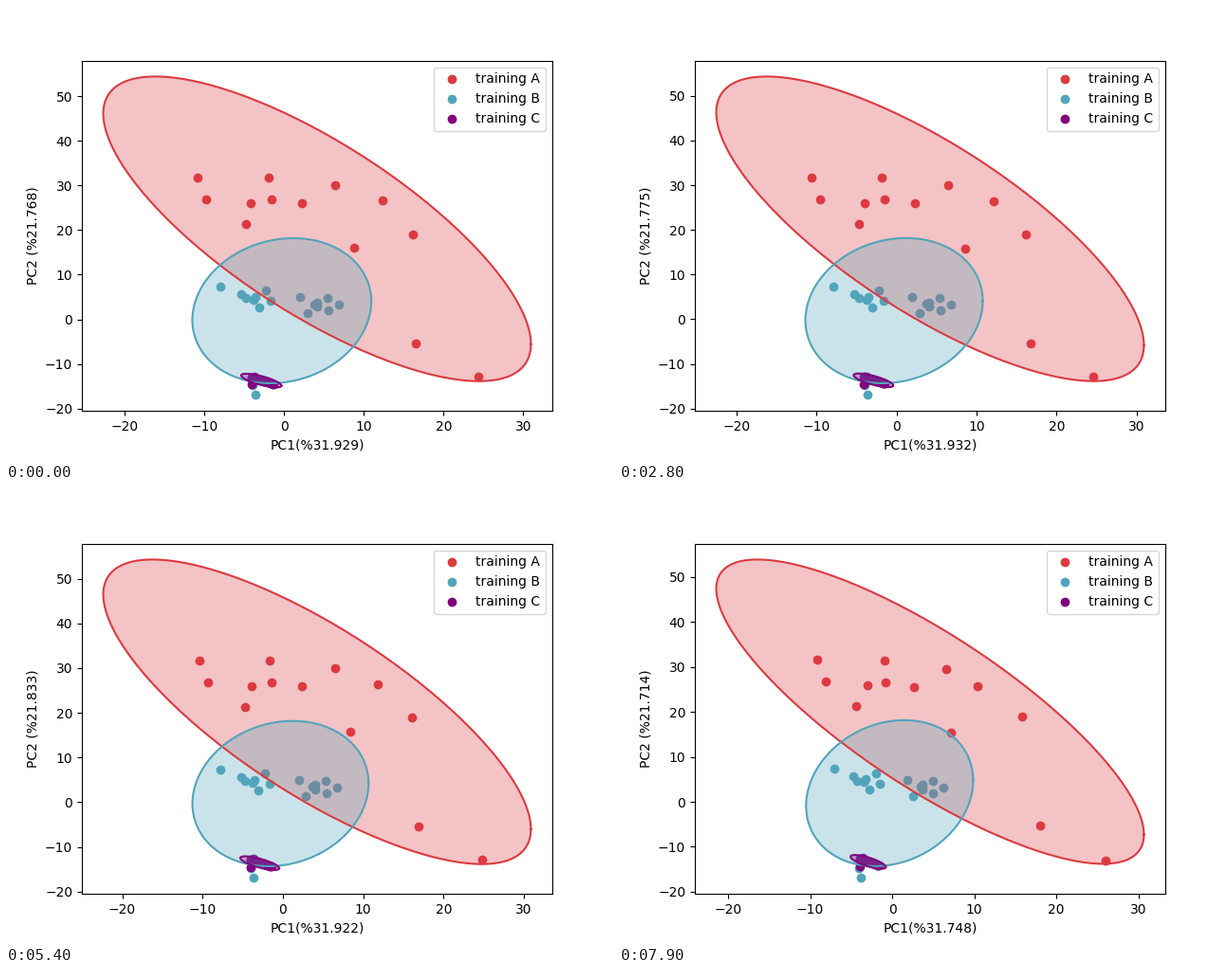
Animation of 640 by 480 pixels, one loop 8 s. Source, as a matplotlib script:

```python
import numpy as np
import matplotlib.pyplot as plt
from matplotlib.animation import FuncAnimation

FRAMES, STEP = 80, 100
COLORS = "#dc3a40", "#52a4bb", "purple"
CHI = np.sqrt(5.991)  # 95 % confidence in two dimensions
MARGIN = 0.05

# Samples drift from an early to a late projection.
KEYS = [0, 18, 28, 41, 54, 70, 79]
PROGRESS = [0, 0.1, 0.14, 0.33, 0.25, 0.95, 1]
PC1 = [31.929, 31.941, 31.932, 31.914, 31.922, 31.732, 31.748]
PC2 = [21.768, 21.770, 21.775, 21.790, 21.833, 21.731, 21.714]

A_EARLY = np.array([
    (-10.86, 31.7), (-9.79, 26.8), (-4.79, 21.3), (-4.19, 26.0),
    (-1.93, 31.7), (-1.57, 26.8), (2.24, 26.0), (6.40, 30.0),
    (8.79, 16.0), (12.36, 26.6), (16.17, 19.0), (16.52, -5.5),
    (24.38, -12.9)])
A_LATE = np.array([
    (-9.16, 31.6), (-8.12, 26.8), (-4.43, 21.3), (-3.04, 26.0),
    (-0.96, 31.4), (-0.84, 26.6), (2.62, 25.6), (6.55, 29.6),
    (7.13, 15.3), (10.36, 25.8), (15.79, 19.0), (17.99, -5.2),
    (25.96, -13.0)])

B_EARLY = np.array([
    (-8.0, 7.3), (-5.38, 5.6), (-4.79, 4.7), (-3.83, 4.4), (-3.6, 5.0),
    (-3.12, 2.7), (-2.29, 6.4), (-1.69, 4.1), (2.0, 4.9), (2.95, 1.3),
    (3.79, 3.4), (4.14, 2.8), (4.14, 3.8), (5.45, 4.7), (5.57, 2.0),
    (6.88, 3.2), (-3.6, -16.96), (-3.95, -14.7)])
bx, by = B_EARLY.T
B_LATE = np.column_stack([0.9 * bx + 0.03 * (by - 4), by])

# A tight streak, denser at both ends, with two strays
streak = (1 - np.cos(np.linspace(0, np.pi, 14))) / 2
C_EARLY = np.vstack([
    np.column_stack([-4.07 + 2.68 * streak, -12.97 - 1.5 * streak]),
    [(-4.07, -14.62), (-3.71, -12.8)]])
C_LATE = (C_EARLY + (2.73, 0)) * (0.85, 1) + (-2.82, 0.35)

GROUPS = (A_EARLY, A_LATE), (B_EARLY, B_LATE), (C_EARLY, C_LATE)
turn = np.linspace(0, 2 * np.pi, 201)
CIRCLE = np.column_stack([np.cos(turn), np.sin(turn)])


def at(values, i):
    return np.interp(i, KEYS, values)


def confidence_ellipse(points):
    root = np.linalg.cholesky(np.cov(points.T))
    return points.mean(axis=0) + CHI * CIRCLE @ root.T


fig, ax = plt.subplots(figsize=(6.4, 4.8), dpi=100)
dots = [ax.scatter([], [], color=c, label=f"training {name}")
        for c, name in zip(COLORS, "ABC")]
fills = [ax.fill([0, 0, 1], [0, 1, 0], color=c, alpha=0.3, linewidth=0)[0]
         for c in COLORS]
edges = [ax.plot([], [], color=c, linewidth=1.5)[0] for c in COLORS]
ax.legend(loc="upper right")


def draw(i):
    w = at(PROGRESS, i)
    extent = []
    for (early, late), dot, fill, edge in zip(GROUPS, dots, fills, edges):
        points = early + (late - early) * w
        ring = confidence_ellipse(points)
        dot.set_offsets(points)
        fill.set_xy(ring)
        edge.set_data(*ring.T)
        extent += [points, ring]

    extent = np.vstack(extent)
    lo, hi = extent.min(axis=0), extent.max(axis=0)
    pad = MARGIN * (hi - lo)
    ax.set_xlim(lo[0] - pad[0], hi[0] + pad[0])
    ax.set_ylim(lo[1] - pad[1], hi[1] + pad[1])
    ax.set_xlabel(f"PC1(%{at(PC1, i):.3f})")
    ax.set_ylabel(f"PC2 (%{at(PC2, i):.3f})")
    return [*dots, *fills, *edges]


anim = FuncAnimation(fig, draw, frames=FRAMES, interval=STEP,
                     repeat=True, repeat_delay=0, blit=False)
plt.show()
```
